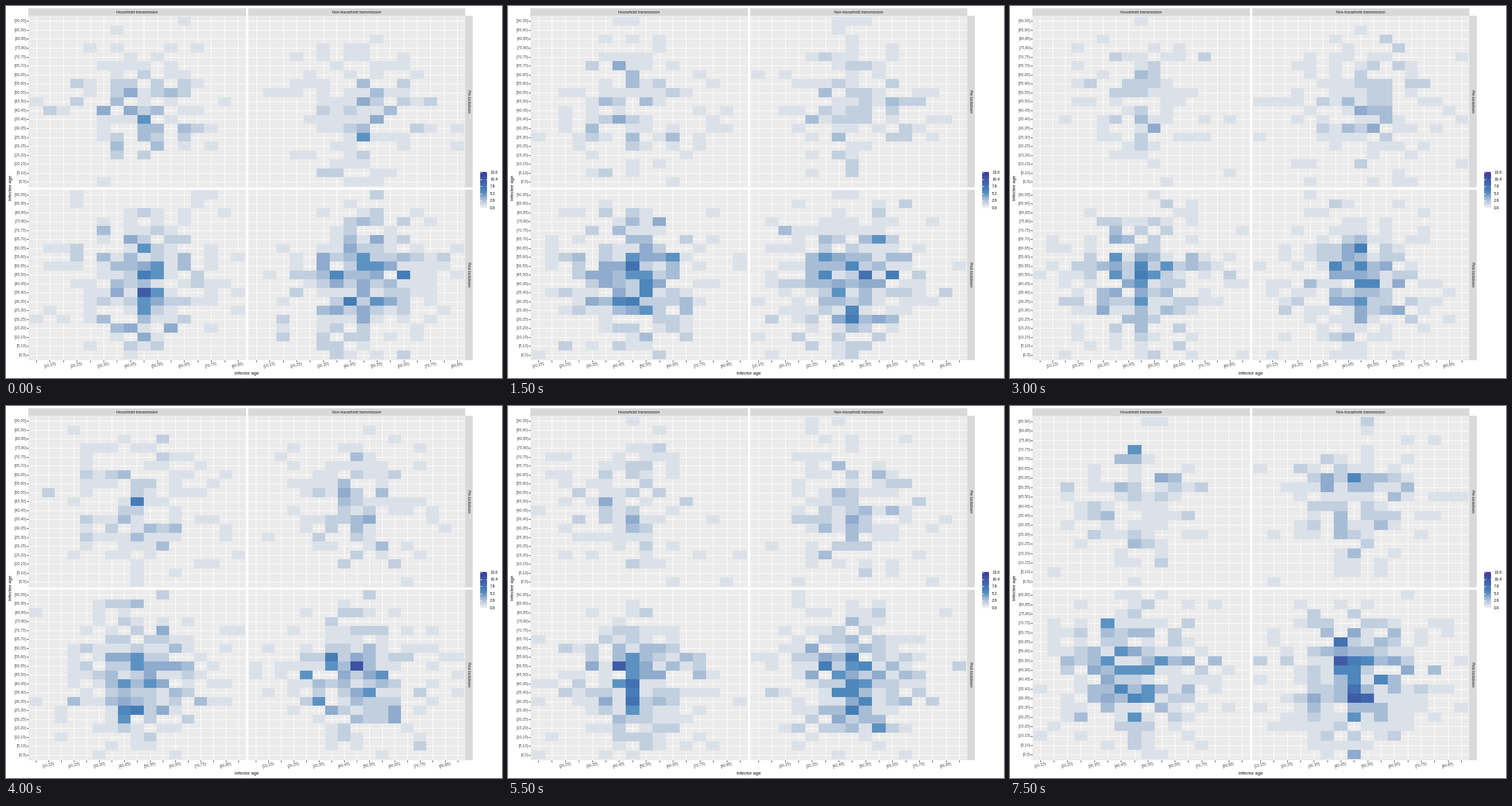
A matplotlib script for the animation above (8 s loop, 864 by 648 pixels).

```python
import numpy as np
import matplotlib.pyplot as plt
from matplotlib.animation import FuncAnimation
from matplotlib.colors import LinearSegmentedColormap
from matplotlib.patches import Rectangle

W, H, DPI = 864, 648, 72
STEP = 500
VMAX = 13

plt.rcParams["font.family"] = "Liberation Sans"

# (left, right) and (top, bottom) of the facet columns and rows, in pixels
COLS = [(39, 418), (422, 800)]
ROWS = [(17, 315.6), (319.5, 617)]

STOPS = [(0, "#f0f1f2"), (1, "#dae0e8"), (4, "#8eabcd"), (5, "#5c92c1"),
         (6.5, "#4682b9"), (VMAX, "#3a3a98")]
CMAP = LinearSegmentedColormap.from_list("cases", [(v / VMAX, c) for v, c in STOPS])

# Infector age group without cases, and for how many draws it stays away
GAPS = [(85, 1), (None, 2), (5, 3), (None, 3), (5, 1), (85, 1), (10, 3),
        (85, 1), (5, 1)]
MISSING = [age for age, draws in GAPS for _ in range(draws)]
FRAMES = len(MISSING)

fig = plt.figure(figsize=(W / DPI, H / DPI), dpi=DPI, facecolor="white")
ax = fig.add_axes([0, 0, 1, 1])


def box(x0, y0, x1, y1, color):
    ax.add_patch(Rectangle((x0, y0), x1 - x0, y1 - y0, fc=color, lw=0,
                           antialiased=False))


def label(x, y, s, size=6.8, color="black", ha="center", rot=0):
    ax.text(x, y, s, fontsize=size, color=color, ha=ha, va="center", rotation=rot)


def line(xs, ys, color, z=1):
    ax.plot(xs, ys, color=color, lw=1, solid_capstyle="butt", zorder=z)


def group(age):
    return f"[{age},{age + 5}{']' if age == 90 else ')'}"


def bell(x, mid, sd):
    return np.exp(-((x - mid) / sd) ** 2 / 2)


def sample(k, ages, n):
    """Case counts of one draw: Poisson around a product of two age profiles."""
    rng = np.random.default_rng(40 + k)
    x, y = np.array(ages) + 2.5, 5 * np.arange(n) + 2.5
    px = bell(x, 47.5, 13) + .5 * bell(x, 47.5, 3) + .04
    py = bell(y, 44, 20) + .4 * bell(y, 52.5, 5) + .35 * bell(y, 32.5, 4) + .06
    share = np.outer(py / py.sum(), px / px.sum())
    return [rng.poisson(total * share) for total in (110, 110, 250, 250)]


def facet(xr, yr, ages, n, cells):
    (x0, x1), (y0, y1) = xr, yr
    # discrete axes keep 0.6 of a cell beyond the outer centres
    dx, dy = (x1 - x0) / (len(ages) + .2), (y1 - y0) / (n + .2)
    xs = x0 + dx * (np.arange(len(ages)) + .6)
    ys = y1 - dy * (np.arange(n) + .6)
    box(x0, y0, x1, y1, "#ebebeb")
    for x in xs:
        line([x, x], [y0, y1], "white")
    for y in ys:
        line([x0, x1], [y, y], "white")
    ax.pcolormesh(x0 + dx * (np.arange(len(ages) + 1) + .1),
                  y1 - dy * (np.arange(n + 1) + .1),
                  np.ma.masked_equal(cells, 0), cmap=CMAP, vmin=0, vmax=VMAX,
                  antialiased=False, zorder=2)
    if xr == COLS[0]:
        for j, y in enumerate(ys):
            line([x0 - 3, x0], [y, y], "#333333")
            label(x0 - 3, y + .5, group(5 * j), color="#4d4d4d", ha="right")
    if yr == ROWS[1]:
        for x, age in zip(xs, ages):
            line([x, x], [y1, y1 + 3], "#333333")
            if age % 10 == 0:
                label(x, y1 + 9, group(age), color="#4d4d4d", rot=15)


def strips():
    for (x0, x1), s in zip(COLS, ("Household transmission",
                                  "Non-household transmission")):
        box(x0, 4, x1, 17, "#d9d9d9")
        label((x0 + x1) / 2, 11.5, s, color="#1a1a1a")
    for (y0, y1), s in zip(ROWS, ("Pre-lockdown", "Post-lockdown")):
        box(800, y0, 813, y1, "#d9d9d9")
        label(805.5, (y0 + y1) / 2, s, color="#1a1a1a", rot=-90)


def legend():
    x0, x1, top, bottom = 826, 838, 289, 352
    ax.pcolormesh([x0, x1], np.linspace(bottom, top, 64),
                  np.linspace(0, VMAX, 63)[:, None], cmap=CMAP, vmin=0,
                  vmax=VMAX, antialiased=False)
    for i in range(6):
        y = bottom - .5 - i * (bottom - top - 1) / 5
        line([x0, x0 + 2.5], [y, y], "white", 3)
        line([x1 - 2.5, x1], [y, y], "white", 3)
        label(843, y + .5, f"{2.6 * i:.1f}", ha="left")


def draw(k):
    ax.clear()
    ax.axis("off")
    ages = [a for a in range(5, 90, 5) if a != MISSING[k]]
    n = 18 if k == FRAMES - 1 else 19  # nobody over 90 in the last draw
    for i, cells in enumerate(sample(k, ages, n)):
        facet(COLS[i % 2], ROWS[i // 2], ages, n, cells)
    strips()
    legend()
    label(419, 640.5, "Infector age", 8)
    label(9, 317, "Infectee age", 8, rot=90)
    ax.set_xlim(0, W)
    ax.set_ylim(H, 0)
    return []


anim = FuncAnimation(fig, draw, frames=FRAMES, init_func=lambda: [],
                     interval=STEP, repeat=True, repeat_delay=0)
plt.show()
```
